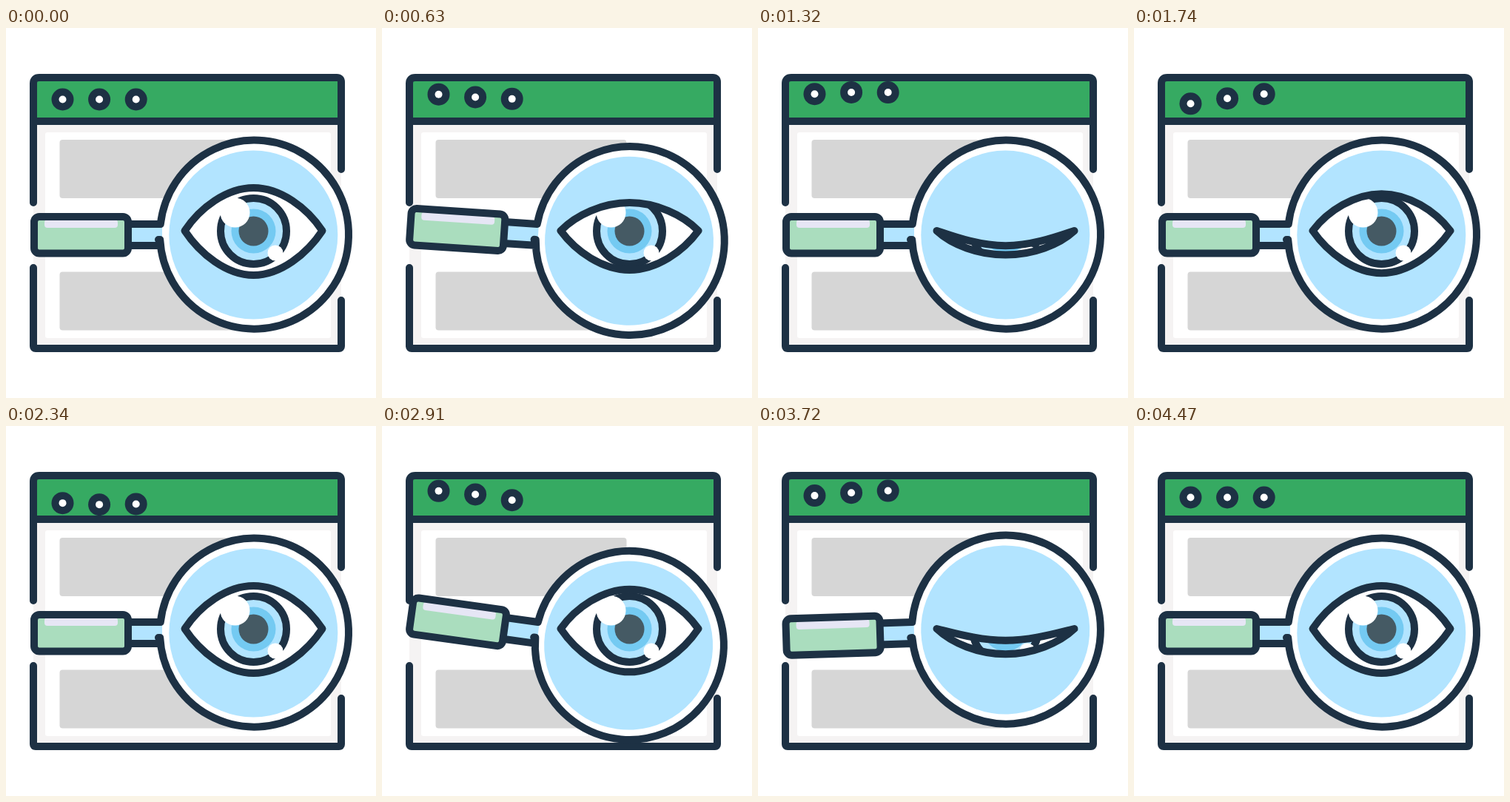
An HTML page for the animation above (4500 ms loop, 500 by 500 pixels).

```html
<!DOCTYPE html>
<html lang="en">
<head>
<meta charset="utf-8">
<title>Browser inspection</title>
<style>
  html, body { margin: 0; width: 100%; height: 100%; overflow: hidden; background: #fff; }
  svg { display: block; width: 100%; height: 100%; }
  .line { fill: none; stroke: #1d3144; stroke-width: 10; stroke-linecap: round; stroke-linejoin: round; }
</style>
</head>
<body>
<svg viewBox="0 0 500 500">
  <defs>
    <clipPath id="lids"><path class="eye"/></clipPath>
    <g id="dot"><circle r="15" fill="#1d3144"/><circle r="5" fill="#fff"/></g>
  </defs>

  <!-- window -->
  <rect x="37" y="67" width="416" height="366" rx="6" fill="#f5f3f3"/>
  <rect x="53" y="141" width="386" height="278" rx="3" fill="#fff"/>
  <rect x="72.5" y="151" width="258" height="79" rx="4" fill="#d6d6d6"/>
  <rect x="72.5" y="329.5" width="258" height="79" rx="4" fill="#d6d6d6"/>
  <path d="M37 126V74q0-7 7-7H446q7 0 7 7V126Z" fill="#36aa62"/>
  <path class="line" d="M37 236V75q0-8 8-8H447q6 0 6 6V191M37 126H453M37 324V430q0 3 3 3H450q3 0 3-3V368"/>
  <use class="dot" href="#dot"/>
  <use class="dot" href="#dot"/>
  <use class="dot" href="#dot"/>

  <!-- magnifier -->
  <g id="glass">
    <circle cx="335.5" cy="279.5" r="127" fill="#fff"/>
    <circle cx="334.3" cy="279.5" r="114" fill="#b2e4ff"/>
    <path d="M165 265H211V294H165Z" fill="#b2e4ff"/>
    <path class="line" d="M165 294H208M206 286H208.2A127.5 127.5 0 1 0 208.8 265H165"/>
    <rect x="38" y="255" width="127" height="49.5" rx="7" fill="#aaddbe"/>
    <rect x="52" y="259" width="99" height="11" rx="4" fill="#e6e6f5"/>
    <rect class="line" x="38" y="255" width="127" height="49.5" rx="7"/>
  </g>

  <!-- eye -->
  <path class="eye" fill="#fff"/>
  <g clip-path="url(#lids)">
    <circle class="line" cx="334.5" cy="274.5" r="44.5" style="fill:#b2e4ff"/>
    <circle cx="334.5" cy="274.5" r="30" fill="#74caf2"/>
    <circle cx="334.5" cy="274.5" r="20" fill="#455a64"/>
    <circle cx="309.5" cy="249.5" r="20" fill="#fff"/>
    <circle cx="364" cy="304" r="10.5" fill="#fff"/>
  </g>
  <path class="eye line"/>
</svg>
<script>
const LOOP = 4500;
const dots = document.querySelectorAll('.dot');
const eyes = document.querySelectorAll('.eye');
const glass = document.getElementById('glass');

// Each track is a list of [time, value] steps.
const bob = [[0, 0], [1040, -9.7], [2090, 9.7], [3090, -9.7], [4080, 0]];
const rock = [[0, 0], [240, 8], [480, -8], [720, 8], [960, -8], [1200, 8], [1320, 0]];
const blink = [[410, 0], [1010, 1], [1290, 1], [1890, 0], [2795, 0], [3395, 1], [3605, 1], [4205, 0]];

// cubic-bezier(.5, 0, .5, 1)
function ease(x) {
  let lo = 0, hi = 1;
  for (let i = 0; i < 20; i++) {
    const u = (lo + hi) / 2;
    if (1.5 * u * (1 - u) + u ** 3 < x) lo = u; else hi = u;
  }
  return lo * lo * (3 - 2 * lo);
}

function at(track, t) {
  const i = track.findIndex(step => step[0] > t);
  if (i === 0) return track[0][1];
  if (i < 0) return track[track.length - 1][1];
  const [t0, a] = track[i - 1], [t1, b] = track[i];
  return a + (b - a) * ease((t - t0) / (t1 - t0));
}

function eyePath(p) {
  const mix = (a, b) => a + (b - a) * p;
  const top = mix(216, 294.5), topSide = mix(243, 281);
  const low = mix(334, 306.5), lowSide = mix(305, 293);
  return `M241.5 274C262 ${topSide} 298 ${top} 334.5 ${top}S407 ${topSide} 427.5 274` +
         `C407 ${lowSide} 371 ${low} 334.5 ${low}S262 ${lowSide} 241.5 274Z`;
}

function draw(now) {
  const t = now % LOOP;
  dots.forEach((dot, i) =>
    dot.setAttribute('transform', `translate(${76.5 + i * 49.6} ${96.5 + at(bob, t - i * 210)})`));
  const angle = at(rock, t < 2655 ? t : t - 2655);
  glass.setAttribute('transform', `rotate(${angle} 210 279.5)`);
  const d = eyePath(at(blink, t));
  eyes.forEach(eye => eye.setAttribute('d', d));
}

const start = performance.now();
function tick() {
  draw(performance.now() - start);
  requestAnimationFrame(tick);
}
tick();
</script>
</body>
</html>
```
